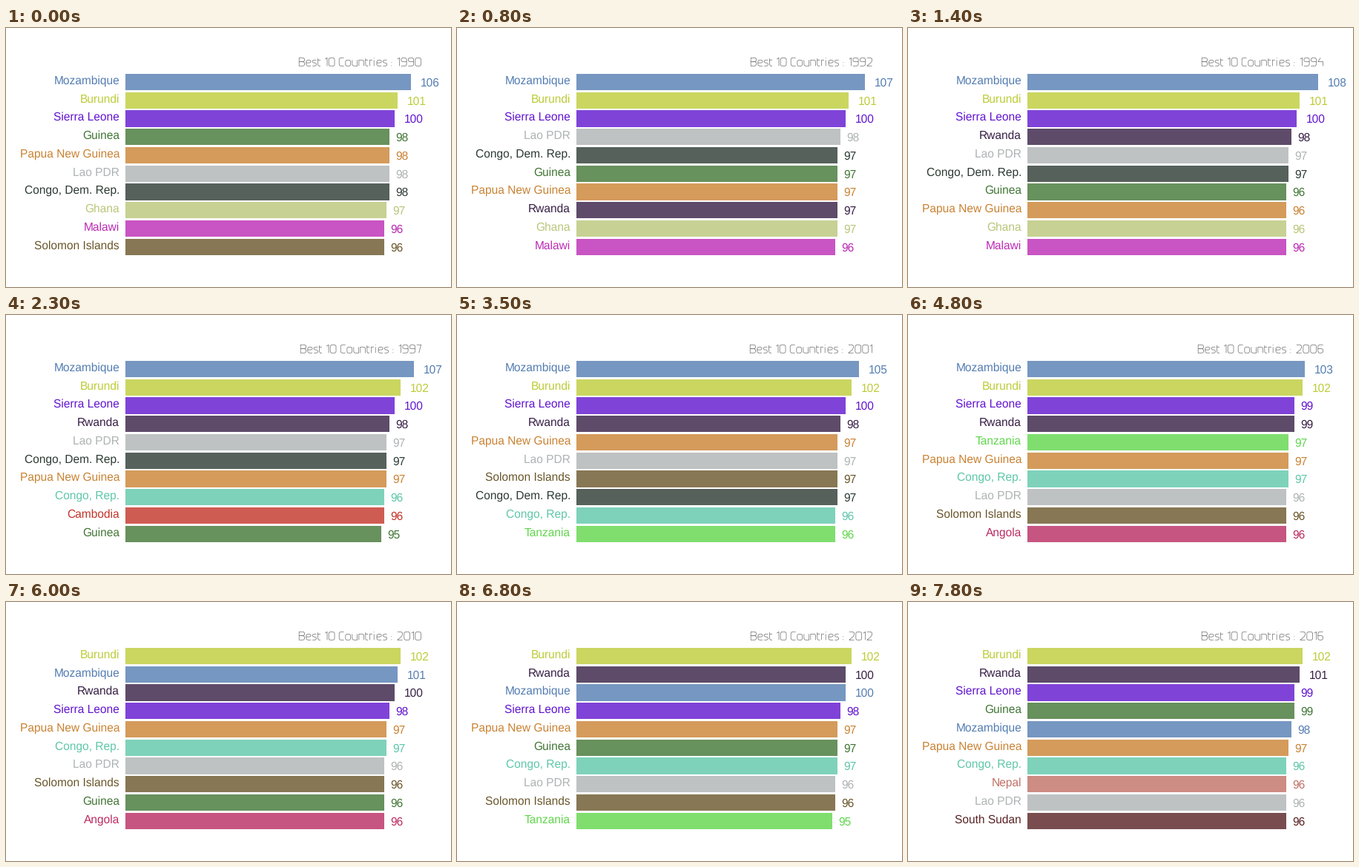
Write a matplotlib script that moves like this. It is 600 px wide and 350 px high and loops after 8000 ms.

```python
import numpy as np
import matplotlib.pyplot as plt
from matplotlib.animation import FuncAnimation
from matplotlib.patches import PathPatch, Rectangle
from matplotlib.path import Path

W, H, DPI = 600, 350, 100
PX = 72 / DPI
ROWS = 10
LEFT, UNIT = 161, 3.632
TOP, STEP, THICK = 61.95, 24.75, 22.27
FONT = 15.5
TITLE_RIGHT, TITLE_BASE = 560.7, 51.3

plt.rcParams["font.family"] = "Liberation Sans"
plt.rcParams["text.hinting"] = "none"

# Bar colour, then the turning points (year, score) joined by straight lines.
COUNTRIES = {
    "Mozambique": ("#547db2", (1990, 106), (1995, 108), (2010, 101), (2016, 98)),
    "Burundi": ("#bdcc38", (1990, 100.9), (2000, 102.1)),
    "Sierra Leone": ("#6114cf", (1990, 100.2), (2002, 100), (2010, 98), (2016, 99.2)),
    "Rwanda": ("#361e44", (1990, 95), (1994, 98), (2002, 98), (2010, 99.9), (2016, 100.65)),
    "Guinea": ("#417635", (1990, 98.4), (1994.5, 96.4), (2000, 94.5), (2010, 95.8), (2016, 98.8)),
    "Papua New Guinea": ("#ca8232", (1990, 98.2), (1994.5, 96.3), (2001, 97.4), (2016, 97)),
    "Lao PDR": ("#aeb3b4", (1990, 98.1), (1994, 97.3), (2001.5, 97.2), (2006, 96.4), (2016, 96)),
    "Congo, Dem. Rep.": ("#2c3a33", (1990, 97.9), (1995, 96.9), (2001.5, 96.8), (2006, 95)),
    "Ghana": ("#b9c678", (1990, 97), (1994.5, 96.2), (1999, 94)),
    "Malawi": ("#bc29b5", (1990, 96.3), (1994.5, 96.1), (1999, 94)),
    "Solomon Islands": ("#695529", (1990, 96.1), (1997, 95), (2001.5, 97), (2006, 96.3), (2016, 95.4)),
    "Congo, Rep.": ("#5ec7a9", (1990, 95), (1998, 96.2), (2007, 96.95), (2016, 96.4)),
    "Cambodia": ("#c33327", (1990, 93), (1998, 95.8), (2006, 94)),
    "Tanzania": ("#60d64b", (1996, 94.5), (2006, 97.4), (2010, 95.3)),
    "Angola": ("#ba2b62", (2001, 94), (2006, 96), (2010, 95.7), (2016, 94)),
    "Nepal": ("#c16f65", (2009, 94), (2016, 96.2)),
    "South Sudan": ("#582123", (2010, 93), (2016, 95.8)),
}

# Title lettering: advance width and pen strokes between the corners of a box:
#   a h b   top
#   c   d   middle
#   e m f   bottom      (t: above a, n: just below a; a lone corner is a dot)
GLYPHS = {
    " ": (4, ""), ":": (4, "e c"),
    "B": (9.6, "ea abdc cdfe"), "C": (8.6, "baef"), "e": (8.4, "cdbaef"),
    "i": (3.8, "ea t"), "n": (9, "ea abf"), "o": (9, "meabfm"),
    "r": (5.8, "ea ab"), "s": (7.4, "bacdfe"), "t": (5.6, "tef ab"),
    "u": (9, "aef bf"),
    "0": (10, "meabfm"), "1": (5, "nb bf"), "2": (9, "abde ef"),
    "3": (8.5, "abdc cdfe"), "4": (9, "hc cd df"), "5": (9, "ba acdfe"),
    "6": (9, "baefdc"), "7": (8, "ab bm"), "8": (9.5, "cabd mecdfm"),
    "9": (9.5, "efbacd"),
}


def corners(ch, advance):
    top, middle = (11, 5.8) if ch.isdigit() or ch.isupper() else (8, 4.2)
    left, right = 1.1, advance - 1.1
    mid = (left + right) / 2
    return dict(a=(left, top), h=(mid, top), b=(right, top),
                c=(left, middle), d=(right, middle),
                e=(left, 0), m=(mid, 0), f=(right, 0),
                t=(left, 10.2), n=(left, top - 1.8))


def soft_stroke(points, radius=2.6):
    """Polyline whose inner corners are rounded."""
    pts = [np.array(p, float) for p in points]
    if len(pts) == 1:
        pts.append(pts[0] + (0, 0.9))
    verts, codes = [pts[0]], [Path.MOVETO]
    for a, b, c in zip(pts, pts[1:], pts[2:]):
        def toward(q):
            length = np.hypot(*(q - b))
            return b + (q - b) * min(radius, length / 2) / length
        verts += [toward(a), b, toward(c)]
        codes += [Path.LINETO, Path.CURVE3, Path.CURVE3]
    verts.append(pts[-1])
    codes.append(Path.LINETO)
    return np.array(verts), codes


def title_path(text):
    x = TITLE_RIGHT - sum(GLYPHS[ch][0] for ch in text)
    verts, codes = [], []
    for ch in text:
        advance, strokes = GLYPHS[ch]
        box = corners(ch, advance)
        for stroke in strokes.split():
            v, c = soft_stroke([box[k] for k in stroke])
            verts.append(v * (1, -1) + (x, TITLE_BASE))
            codes += c
        x += advance
    return Path(np.concatenate(verts), codes)


def score(key, year):
    years, values = zip(*COUNTRIES[key][1:])
    return np.interp(year, years, values)


fig = plt.figure(figsize=(W / DPI, H / DPI), dpi=DPI, facecolor="white")
ax = fig.add_axes([0, 0, 1, 1])
ax.set_xlim(0, W)
ax.set_ylim(H, 0)
ax.axis("off")

title = ax.add_patch(PathPatch(title_path("1990"), fill=False,
                               ec="#7c7c7c", lw=0.8 * PX))
bars, names, values = [], [], []
for row in range(ROWS):
    y = TOP + row * STEP
    top, bottom = round(y), round(y + THICK)
    bars.append(ax.add_patch(Rectangle((LEFT, top), 1, bottom - top,
                                       lw=0, alpha=0.8, antialiased=False)))
    names.append(ax.text(153, round(y + 14), "", size=FONT * PX,
                         ha="right", va="baseline"))
    values.append(ax.text(0, round(y + 16.95), "", size=FONT * PX,
                          ha="left", va="baseline"))


def draw(frame):
    # Two states per year: 200 ms on the year, 100 ms halfway to the next.
    year = 1990 + frame // 3 + (0.5 if frame % 3 == 2 else 0)
    scores = {key: score(key, year) for key in COUNTRIES}
    best = sorted(scores, key=scores.get, reverse=True)[:ROWS]
    title.set_path(title_path(f"Best 10 Countries : {int(year)}"))
    for bar, name, value, key in zip(bars, names, values, best):
        color = COUNTRIES[key][0]
        number = round(scores[key])
        label = str(number)
        end = round(LEFT + 0.1 + UNIT * number)
        bar.set_width(end - LEFT)
        bar.set_facecolor(color)
        name.set_text(key)
        name.set_color(color)
        value.set_text(label)
        value.set_color(color)
        value.set_x(end + len(label) * FONT * 0.278 - 0.5)
    return [title, *bars, *names, *values]


anim = FuncAnimation(fig, draw, frames=80, interval=100, repeat=True,
                     repeat_delay=0, blit=False)
plt.show()
```
